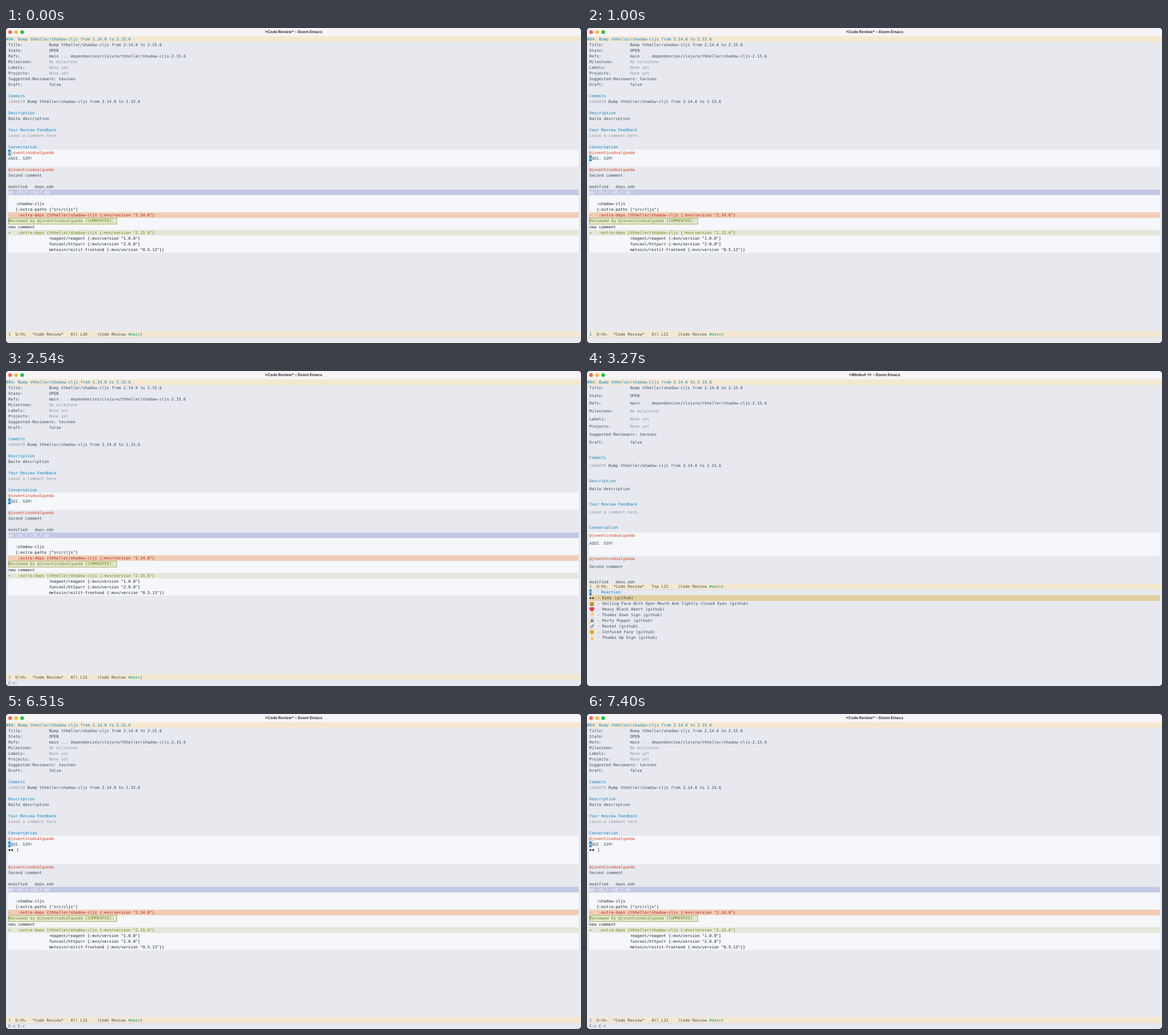
These frames come from a looping animation (1010 by 555 pixels, 8000 ms). An HTML page:

```html
<!DOCTYPE html>
<html lang="en">
<head>
<meta charset="utf-8">
<title>Code Review</title>
<style>
  html, body { margin: 0; width: 100%; height: 100%; overflow: hidden; background: #2b1a3d; }
  svg { display: block; width: 1010px; height: 555px; }
  text {
    font: 7px "DejaVu Sans Mono", monospace;
    white-space: pre;
    text-rendering: geometricPrecision;
    fill: #3b4f57;
  }
  .title { font: 700 6.8px Inter, sans-serif; text-anchor: middle; fill: #3a383c; }
  .b { fill: #0a84c9; }
  .d { fill: #8f9aa1; }
  .u { fill: #cf4020; }
  .g { fill: #109a8c; }
  .w { fill: #fbfcfe; }
  .k { fill: #1e2529; }
  .r { fill: #b3211f; }
  .a { fill: #6f8505; }

  /* Hard cuts over one 8 s loop */
  .cut { opacity: 0; animation: 8s step-end infinite; }
  .review { animation-name: review; }
  .line20 { animation-name: line20; }
  .line21 { animation-name: line21; }
  .prefix { animation-name: prefix; }
  .picker { animation-name: picker; }
  .reacted { animation-name: reacted; }
  @keyframes review { 0% { opacity: 1 } 40.875%, 100% { opacity: 0 } }
  @keyframes line20 { 0% { opacity: 1 } 12.5%, 100% { opacity: 0 } }
  @keyframes line21 { 0% { opacity: 0 } 12.5% { opacity: 1 } 40.875%, 100% { opacity: 0 } }
  @keyframes prefix { 0% { opacity: 0 } 18% { opacity: 1 } 40.875%, 100% { opacity: 0 } }
  @keyframes picker { 0% { opacity: 0 } 40.875% { opacity: 1 } 81.375%, 100% { opacity: 0 } }
  @keyframes reacted { 0% { opacity: 0 } 81.375%, 100% { opacity: 1 } }
</style>
</head>
<body>
<svg id="stage" viewBox="0 0 1010 555">
  <defs>
    <clipPath id="window"><rect width="1010" height="555" rx="5"/></clipPath>
    <g id="eyes">
      <ellipse cx="2.1" cy="5" rx="2" ry="2.3" fill="#fff"/>
      <ellipse cx="6.8" cy="5" rx="2" ry="2.3" fill="#fff"/>
      <circle cx="2.1" cy="5.1" r="1.7" fill="#2b2422"/>
      <circle cx="6.8" cy="5.1" r="1.7" fill="#2b2422"/>
    </g>
    <g id="laugh">
      <circle cx="4.6" cy="5" r="4.3" fill="#fbc62f"/>
      <path d="M1.8 3l1.8 1-1.8.8M7.4 3l-1.8 1 1.8.8" fill="none" stroke="#54330f" stroke-width=".7"/>
      <path d="M1.8 5.6h5.6q-.3 2.8-2.8 2.8t-2.8-2.8" fill="#5b2a14"/>
      <path d="M2.2 5.7h4.8l-.3.9H2.5z" fill="#fff"/>
    </g>
    <path id="heart" d="M4.6 9C2.5 7.6.2 5.8.2 3.4.2.6 3.600 0 4.600 2.300 5.600 0 9 .6 9 3.400 9 5.800 6.700 7.600 4.600 9" fill="#f0384a"/>
    <g id="thumb">
      <path d="M4.300.7Q5.600.6 5.500 2.200L5.300 4Q7.800 3.900 7.700 5.200 8 7 6.700 8.800 5.500 9.700 3.500 9.200 1.900 8.600 1.700 6.600 1.700 5.300 3 4.500 4 3.400 4.300.7z" fill="#fbd06b"/>
      <path d="M5.200 5.500h2.300M5.200 6.700h2.200M5 7.900h2" stroke="#dfa043" stroke-width=".4"/>
    </g>
    <g id="popper">
      <path d="M.7 9L3 3.400 6.500 6.800z" fill="#e5b13f"/>
      <ellipse cx="4.800" cy="5" rx="1.200" ry="2.600" transform="rotate(-45 4.800 5)" fill="#50453e"/>
      <path d="M5.200 4Q6.500 2.800 5.800.9M5.900 5Q7 3.800 8.800 4.200" fill="none" stroke="#3f8fd0" stroke-width=".8"/>
      <path d="M2 1.300h1M7.500 1.700h1M7.700 7.400h1" stroke="#df5361" stroke-width="1"/>
    </g>
    <g id="rocket">
      <path d="M2.800 4.500L.8 5.400 2.500 6.600zM5.300 7.100L4.500 9 3.200 7.500z" fill="#d8514a"/>
      <path d="M2.300 6.800Q3.400 2.500 8.600 1 7.800 6 3.200 7.700z" fill="#b3c1ce" stroke="#8493a1" stroke-width=".4"/>
      <circle cx="6" cy="3.700" r="1" fill="#387fae"/>
      <path d="M2.200 7.200L.8 9" stroke="#f3a53b" stroke-width="1"/>
    </g>
    <g id="confused">
      <circle cx="4.600" cy="5" r="4.300" fill="#fbc62f"/>
      <circle cx="3" cy="4" r=".7" fill="#54330f"/>
      <circle cx="6.300" cy="4" r=".7" fill="#54330f"/>
      <path d="M3 7.400Q4.500 6.100 6.600 6.500" fill="none" stroke="#54330f" stroke-width=".7"/>
    </g>
  </defs>
</svg>
<script>
const LEFT = 4, TOP = 14.6, ROW = 10, COL = 4.214, RIGHT = 1006;
const HANDLE = "@joventinodsalgueda";
const BUMP = "Bump thheller/shadow-cljs from 2.14.0 to 2.15.6";
const PAPER = "#f5f7fa", CREAM = "#f5e8d1", BLUE = "#0a84c9";

const escape = s => s.replace(/&/g, "&amp;").replace(/</g, "&lt;");

const rect = (x, y, w, h, fill, extra = "") =>
  `<rect x="${x}" y="${y}" width="${w}" height="${h}" fill="${fill}" ${extra}/>`;

const band = (y, h, fill) => rect(LEFT, y, RIGHT - LEFT, h, fill);

// "~b words~" paints words in class b
const text = (top, str, x = LEFT) => {
  const spans = str.split("~").map((part, i) =>
    i % 2 ? `<tspan class="${part[0]}">${escape(part.slice(2))}</tspan>` : escape(part));
  return `<text x="${x}" y="${top + 7.3}">${spans.join("")}</text>`;
};

const cut = (name, ...parts) => `<g class="cut ${name}">${parts.join("")}</g>`;
const emoji = (id, y) => `<use href="#${id}" x="${LEFT}" y="${y}"/>`;
const cursor = (y, char) => rect(LEFT, y, COL, ROW, BLUE) + text(y, `~w ${char}~`);
const field = (name, value) => name.padEnd(17) + value;
const pad = n => " ".repeat(n);
const mark = y => rect(0, y + 4.8, 2, 0.7, "#c3c8cf");

const windowTitle = name =>
  `<text class="title" x="505" y="9.4">${name} – Doom Emacs</text>`;

const modeBar = y => rect(0, y, 1010, 10.4, CREAM) + rect(0, y + 10.4, 1010, 0.6, "#d9d6d2");
const modeText = (y, place) =>
  text(y, `~b 1~  U:%%-  *Code Review*   ${place}    (Code Review ~g #main~)`);

const summary = [
  field("Title:", BUMP),
  field("State:", "OPEN"),
  field("Refs:", "main ~d ...~ dependencies/clojure/thheller/shadow-cljs-2.15.6"),
  field("Milestone:", "~d No milestone~"),
  field("Labels:", "~d None yet~"),
  field("Projects:", "~d None yet~"),
  "Suggested-Reviewers: tavineo",
  field("Draft:", "false"),
  "",
  "~b Commits~",
  "~d cd4e5f0~ " + BUMP,
  "",
  "~b Description~",
  "Baita description",
  "",
  "~b Your Review Feedback~",
  "~d Leave a comment here.~",
  "",
  "~b Conversation~",
  `~u ${HANDLE}~`,
  "AQUI. SIM!",
];

const rest = ["", `~u ${HANDLE}~`, "Second comment", "", "modified   deps.edn"];

// Buffer down to the file name; extra rows follow the first comment
function conversation(step, extra = 0) {
  const y = i => TOP + ROW + i * step;
  const lines = [...summary, ...Array(extra).fill(""), ...rest];
  return band(y(19), step * (3 + extra), PAPER) +
    lines.map((line, i) =>
      (i === 0 || /^~[bu]/.test(line) ? mark(y(i)) : "") + text(y(i), line)).join("");
}

function diff(top) {
  const y = i => top + i * ROW;
  const tail = i => y(i) + 1;
  const dep = (i, lib, version, end = "}") =>
    text(tail(i), `~k ${pad(17)}${lib} {:mvn/version "${version}"}${end === "}" ? "" : "}"}~`);
  return band(y(0), ROW, "#c3c8e4") +
    band(y(1), 101, PAPER) +
    band(y(4), ROW, "#f1cdb6") +
    band(tail(7), ROW, "#e4e8da") +
    mark(y(0)) +
    text(y(0), "~w @@ -35,7 +35,7 @@~") +
    text(y(2), `~k ${pad(3)}:shadow-cljs~`) +
    text(y(3), `~k ${pad(3)}{:extra-paths ["src/cljs"]~`) +
    text(y(4), `~r -   :extra-deps {thheller/shadow-cljs {:mvn/version "2.14.0"}~`) +
    rect(LEFT + 0.4, y(5) + 0.4, 190, 10.4, "#e6e9d8", 'stroke="#8f9f3c" stroke-width=".8"') +
    text(y(5) + 0.5, `~a Reviewed by ${HANDLE} [COMMENTED]:~`, LEFT + 0.5) +
    text(tail(6), "~k new comment~") +
    text(tail(7), `~a +   :extra-deps {thheller/shadow-cljs {:mvn/version "2.15.6"}~`) +
    dep(8, "reagent/reagent", "1.0.0") +
    dep(9, "funcool/httpurr", "2.0.0") +
    dep(10, "metosin/reitit-frontend", "0.5.13", "}}");
}

const reactions = [
  ["eyes", "Eyes"],
  ["laugh", "Smiling Face With Open Mouth And Tightly-closed Eyes"],
  ["heart", "Heavy Black Heart"],
  ["down", "Thumbs Down Sign"],
  ["popper", "Party Popper"],
  ["rocket", "Rocket"],
  ["confused", "Confused Face"],
  ["thumb", "Thumbs Up Sign"],
];

function reactionList(top) {
  const icon = (id, y) => id === "down"
    ? `<use href="#thumb" transform="translate(${LEFT} ${y + 10}) scale(1 -1)"/>`
    : emoji(id, y);
  return text(top, "     ~b Reaction:~") + cursor(top, "8") +
    band(top + ROW, ROW, "#e3cf9f") +
    reactions.map(([id, name], i) => {
      const y = top + ROW * (i + 1);
      return icon(id, y) + text(y, `- ${name} (github)`, 18.2);
    }).join("");
}

const row = n => TOP + n * ROW;
const MODE = 534.2, ECHO = 544.8, MINI = 374.4;

const frame =
  rect(0, 0, 1010, 555, "#e7e9ef") +
  rect(0, 0, 1010, TOP, "#f6f4f7") +
  rect(0, TOP, 1010, ROW, CREAM) +
  ["#fe5f57", "#febc2e", "#28c03f"].map((c, i) =>
    `<circle cx="${7.2 + i * 10.6}" cy="7.200" r="3.200" fill="${c}"/>`).join("") +
  text(TOP, `~b #84: ${BUMP}~`, 0);

const scenes =
  cut("review",
    windowTitle("*Code Review*"), conversation(ROW), diff(row(27)), modeBar(MODE)) +
  cut("line20", cursor(row(20), "@"), modeText(MODE, "All L20")) +
  cut("line21", cursor(row(21), "A"), modeText(MODE, "All L21")) +
  cut("prefix", text(ECHO, "C-c-")) +
  cut("picker",
    windowTitle("*Minibuf-1*"), conversation(13.68),
    modeBar(MINI), modeText(MINI, "Top L21"), reactionList(MINI + 10.6)) +
  cut("reacted",
    windowTitle("*Code Review*"), conversation(ROW, 2), diff(row(29)),
    cursor(row(21), "A"), emoji("eyes", row(22)), text(row(22), "1", 18.2),
    modeBar(MODE), modeText(MODE, "All L21"), text(ECHO, "C-c C-r"));

document.getElementById("stage").insertAdjacentHTML("beforeend",
  `<g clip-path="url(#window)">${frame}${scenes}</g>`);
</script>
</body>
</html>
```
